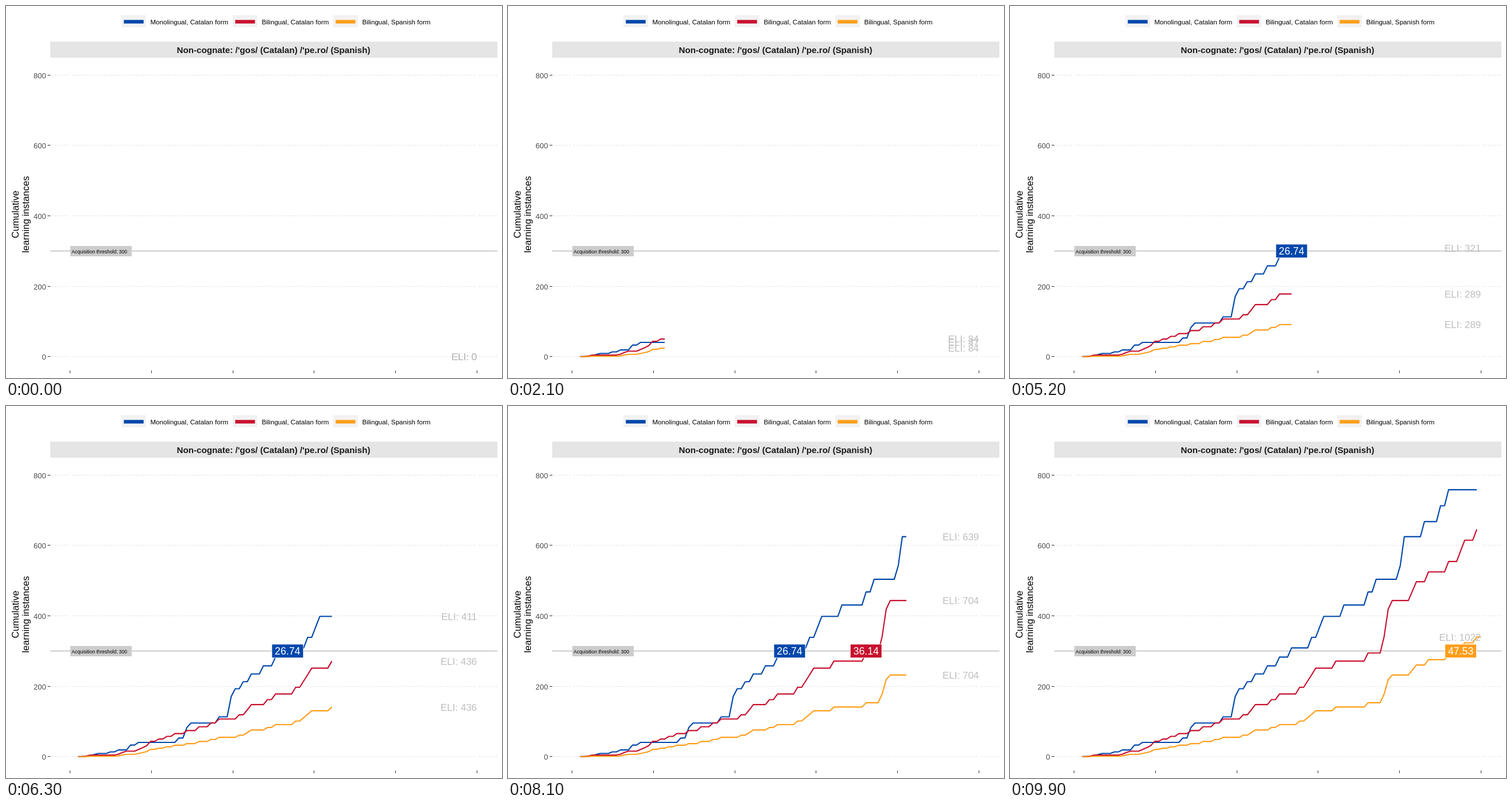
An HTML page with a canvas for the animation above (10 s loop, 864x648 px).

```html
<!DOCTYPE html>
<html lang="en">
<head>
<meta charset="utf-8">
<title>Cumulative learning instances</title>
<style>
  html, body { margin: 0; width: 100%; height: 100%; overflow: hidden; background: #fff; }
  canvas { display: block; }
</style>
</head>
<body>
<canvas id="chart" width="864" height="648"></canvas>
<script>
const ctx = document.getElementById('chart').getContext('2d');
const LAST = 99, LOOP = 10000, STEP = 100;
const BLUE = '#0047ab', RED = '#c8102e', ORANGE = '#ff9e1b', GREY = '#bebebe';
const monthX = m => 111.6 + 14.17 * m;
const pointX = k => monthX(1 + k * 49 / LAST);
const valueY = v => 610.8 - 0.613 * v;

// Each pair: the point where the count jumps, and its new value.
const monoJumps = [[0, 0], [1, 0.5], [2, 1], [3, 3], [4, 6], [5, 9], [8, 13.5], [10, 19], [13, 33],
  [15, 40.5], [25, 53], [27, 83], [28, 95.5], [35, 113], [38, 171], [39, 193], [41, 213], [43, 235],
  [46, 258], [49, 283], [52, 309], [57, 339], [59, 369], [60, 398.5], [65, 431], [71, 468], [73, 504],
  [79, 543], [80, 625], [85, 668], [89, 713], [91, 758.5]];
const biJumps = [[0, 0], [2, 1.5], [3, 4.5], [10, 7], [11, 12], [12, 15.5], [15, 20.5], [16, 25.5],
  [17, 31], [18, 43.5], [20, 50], [22, 57.5], [24, 65.5], [27, 74], [30, 85], [33, 96], [35, 107],
  [40, 119], [42, 133], [43, 148], [47, 162], [49, 178], [54, 197], [56, 215], [57, 233], [58, 251.5],
  [63, 271.5], [71, 294.5], [75, 342], [76, 419], [77, 443.5], [82, 470], [83, 497], [86, 525],
  [91, 554.5], [94, 585], [95, 615], [98, 646]];

function expand(jumps) {
  const out = [];
  let j = 0;
  for (let k = 0; k <= LAST; k++) {
    if (j + 1 < jumps.length && jumps[j + 1][0] <= k) j++;
    out.push(jumps[j][1]);
  }
  return out;
}

function interpolate(v, from, to) {
  let i = 1;
  while (i < from.length - 1 && v > from[i]) i++;
  return to[i - 1] + (to[i] - to[i - 1]) * (v - from[i - 1]) / (from[i] - from[i - 1]);
}

const mono = expand(monoJumps), bi = expand(biJumps);
const biKnots = [0, 4.5, 50, 107, 178, 271.5, 443.5, 646];
const monoEli = mono.map(v => interpolate(v,
  [0, 40.5, 113, 309, 398.5, 625, 758.5], [0, 47, 122, 321, 411, 639, 774]));
const biEli = bi.map(v => interpolate(v, biKnots, [0, 8, 84, 174, 289, 436, 704, 1022]));
const spanish = bi.map(v => interpolate(v, biKnots, [0, 1, 24, 55, 91, 141, 232, 340]));

const series = [
  { color: BLUE, values: mono, eli: monoEli, reached: 52, month: 26.74, end: 98 },
  { color: RED, values: bi, eli: biEli, reached: 71, month: 36.14, end: 98 },
  { color: ORANGE, values: spanish, eli: biEli, reached: 94, month: 47.53, end: LAST }
];

function text(str, x, y, size, color, align = 'left', weight = '') {
  ctx.font = `${weight} ${size}px "Liberation Sans", Arial, sans-serif`;
  ctx.fillStyle = color;
  ctx.textAlign = align;
  ctx.fillText(str, x, y);
}

function rect(x, y, w, h, color) {
  ctx.fillStyle = color;
  ctx.fillRect(x, y, w, h);
}

function line(points, color, width, dash = []) {
  ctx.strokeStyle = color;
  ctx.lineWidth = width;
  ctx.lineJoin = 'round';
  ctx.setLineDash(dash);
  ctx.beginPath();
  points.forEach(([x, y]) => ctx.lineTo(x, y));
  ctx.stroke();
  ctx.setLineDash([]);
}

function drawLegend() {
  [[201, 'Monolingual, Catalan form', BLUE], [395, 'Bilingual, Catalan form', RED],
    [570, 'Bilingual, Spanish form', ORANGE]].forEach(([x, label, color]) => {
    rect(x, 16, 43, 21, '#f2f2f2');
    rect(x + 4.3, 24.3, 34.4, 6.2, color);
    text(label, x + 50.4, 32, 11.65, '#000');
  });
}

function drawAxes() {
  rect(77, 62, 779, 28, '#e5e5e5');
  text("Non-cognate: /'gos/ (Catalan) /'pe.ro/ (Spanish)", 466, 82, 15.2, '#1a1a1a', 'center', 'bold');
  for (let v = 0; v <= 800; v += 200) {
    const y = Math.floor(valueY(v)) + 0.5;
    line([[77, y], [856, y]], GREY, 1.07, [1.07, 3.2]);
    line([[72.5, y], [77, y]], '#333', 1.07);
    text(v, 69.8, y + 5, 13, '#4d4d4d', 'right');
  }
  for (let m = 0; m <= 50; m += 10) {
    const x = Math.floor(monthX(m)) + 0.5;
    line([[x, 635], [x, 639.5]], '#333', 1.07);
  }
  [0, 50].forEach(m => rect(monthX(m) - 2.5, 90, 5, 545, '#fff'));

  ctx.save();
  ctx.rotate(-Math.PI / 2);
  text('Cumulative', -363, 21.5, 16.6, '#000', 'center');
  text('learning instances', -363, 39.5, 16.6, '#000', 'center');
  ctx.restore();
}

function drawThreshold() {
  line([[77, 426.8], [856, 426.8]], '#ccc', 2.1);
  rect(112, 418, 107, 18, '#ccc');
  text('Acquisition threshold: 300', 114.3, 431, 8.45, '#000');
}

function drawSeries(n) {
  for (const s of series) {
    const shown = s.values.slice(0, Math.min(n, s.end) + 1);
    if (n) line(shown.map((v, k) => [pointX(k), valueY(v)]), s.color, 2.13);
  }
  const active = series.filter(s => n <= s.end);
  for (const s of active) {
    text('ELI: ' + Math.round(s.eli[n]), 820.3, valueY(s.values[n]) + 6.2, 17, GREY, 'right');
  }
  for (const s of active.filter(s => n >= s.reached)) {
    const x = monthX(s.month);
    rect(x - 27.8, 414.6, 55.6, 24.4, '#fff');
    rect(x - 27, 415.4, 54, 22.8, s.color);
    text(s.month.toFixed(2), x, 433.3, 17.7, '#fff', 'center');
  }
}

function draw() {
  rect(0, 0, 864, 648, '#fff');
  drawLegend();
  drawAxes();
  drawThreshold();
  drawSeries(Math.floor(performance.now() % LOOP / STEP));
  requestAnimationFrame(draw);
}
draw();
</script>
</body>
</html>
```
